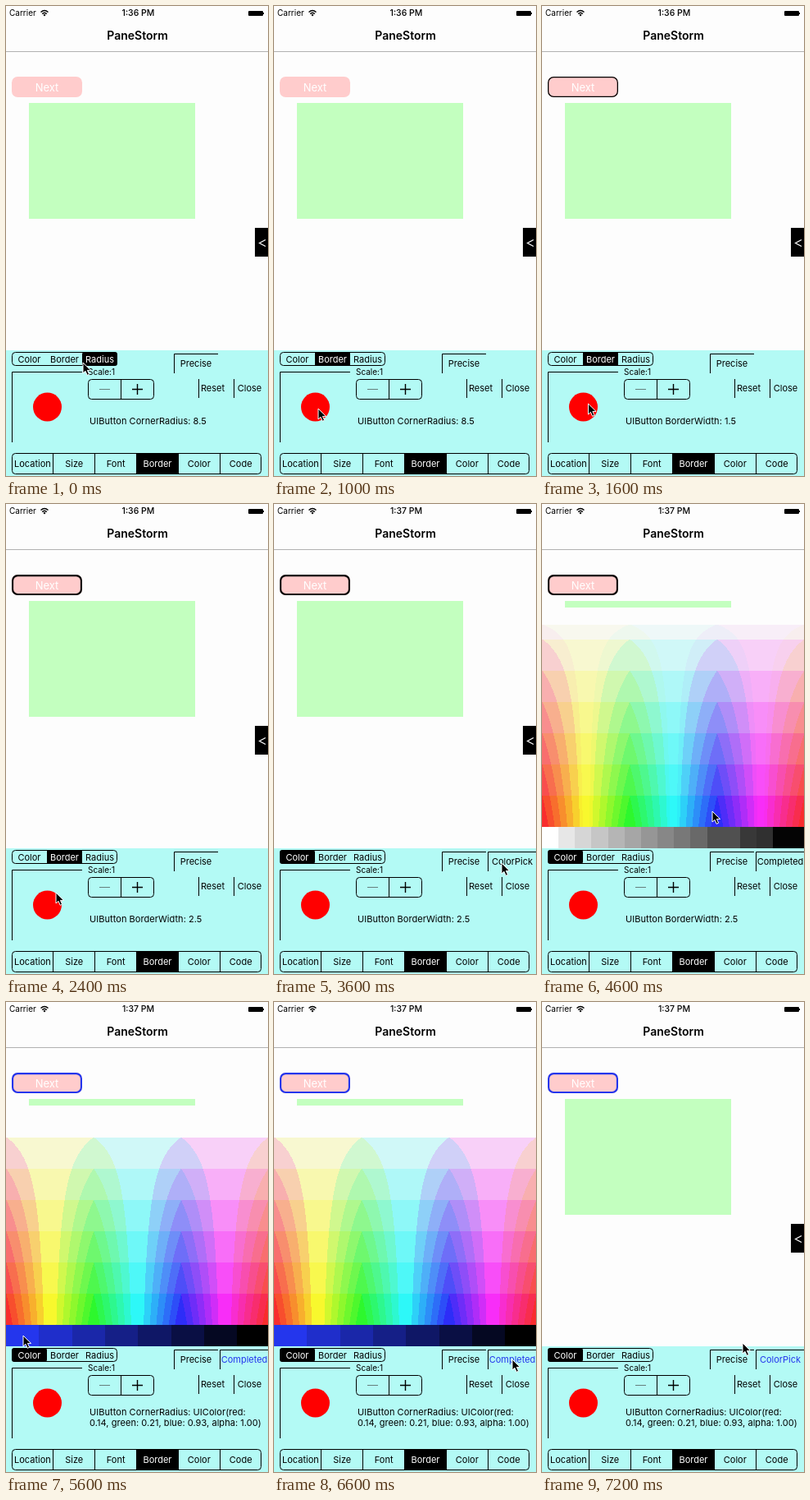
Write an HTML page with a canvas that moves like this. It is 320x572 px and loops after 7400 ms.

```html
<!DOCTYPE html>
<html lang="en">
<head>
<meta charset="utf-8">
<style>
html, body { margin: 0; width: 100%; height: 100%; overflow: hidden; background: #fdfdfd; }
svg, canvas { position: absolute; left: 0; top: 0; }
#picker { top: 126px; }
text { font: 11px Inter, sans-serif; }
.mid { text-anchor: middle; }
.info { letter-spacing: .05px; }
.line { fill: none; stroke: #000; }
</style>
</head>
<body>
<svg width="320" height="572">
  <text x="4" y="12" style="font-size:10px">Carrier</text>
  <g class="line" stroke-width="1.5">
    <path d="M42.5 7.5Q47 3.5 51.5 7.5M44.3 9.6Q47 7 49.7 9.6"/>
    <circle cx="47" cy="11" r=".5"/>
  </g>
  <text id="clock" class="mid" x="161.5" y="12" style="font-size:10.5px;font-weight:500"></text>
  <path d="M297 6h16q1 0 1 1v1h1v2h-1v1q0 1-1 1h-16q-1 0-1-1V7q0-1 1-1"/>
  <text class="mid" x="160.5" y="41" style="font-size:14px;font-weight:600">PaneStorm</text>
  <path d="M0 55.5h320" stroke="#b2b2b2"/>

  <rect x="7" y="86" width="86" height="25" rx="7.25" fill="#fcc"/>
  <text class="mid" x="50" y="103.5" fill="#fff" style="font-size:13px">Next</text>
  <rect id="border" fill="none"/>
  <path d="M28 118h203v141H28z" fill="#c3ffbf"/>
  <path d="M304 270h16v35h-16z"/>
  <path d="M317 284.5l-7.5 4 7.5 4" fill="none" stroke="#fff" stroke-width="1.2"/>

  <path d="M0 419h320v153H0z" fill="#b3faf5"/>
  <g id="topTabs"></g>
  <g id="bottomTabs"></g>
  <path class="line" d="M7.5 531V445.5H93M205.5 447V423.5H259M235.5 454v23M278.5 454v23"/>
  <circle cx="50.5" cy="488" r="17.5" fill="red"/>
  <text x="100" y="449" style="font-size:10px">Scale:1</text>
  <rect class="line" x="100.5" y="454.5" width="80" height="24" rx="4"/>
  <path class="line" d="M140.5 454v25"/>
  <path d="M114 466.5h13" stroke="#667f7d"/>
  <path class="line" d="M154 466.5h13M160.5 460v13" stroke-width="1.4"/>
  <text class="mid" x="232" y="439">Precise</text>
  <text class="mid" x="252.5" y="469">Reset</text>
  <text class="mid" x="297.5" y="469">Close</text>
  <g id="pick">
    <path class="line" d="M261.5 447V423.5H320"/>
    <text id="pickLabel" class="mid" x="291" y="439"></text>
  </g>
  <text id="info1" class="info" x="102"></text>
  <text id="info2" class="info" x="102" y="516"></text>
</svg>
<canvas id="picker" width="320" height="293"></canvas>
<svg width="320" height="572">
  <path id="cursor" d="M-1 0V13L2 10.3 4.2 15.3 6.6 14.2 4.4 9.4H8.6Z" stroke="#fff" stroke-linejoin="round"/>
</svg>
<script>
const LOOP = 7400, STEP = 200;
const BLUE = [36, 54, 237];
const blueCss = `rgb(${BLUE})`;
const path = [
  [0, 95, 434], [400, 72, 430], [600, 72, 430], [1000, 55, 490], [1200, 55, 490],
  [2200, 62, 473], [2400, 62, 473], [2800, 28, 430], [3000, 28, 430], [3600, 279, 437],
  [4000, 279, 437], [4600, 209, 374], [4800, 208, 354], [5200, 208, 354], [5600, 22, 406],
  [5800, 22, 406], [6400, 292, 435], [6800, 292, 435], [7200, 246, 415]
];
const $ = id => document.getElementById(id);
const set = (el, attrs) => {
  for (const name in attrs) el.setAttribute(name, attrs[name]);
};

function drawTabs(id, names, selected, x, y, width, height, baseline, dividers) {
  let out = '';
  names.forEach((name, i) => {
    const left = x + i * width, on = i === selected;
    if (on) out += `<rect x="${Math.floor(left)}" y="${y}" width="${Math.ceil(width)}" height="${height}" rx="${i % (names.length - 1) ? 0 : 3}"/>`;
    if (i && dividers) out += `<path class="line" d="M${Math.floor(left) + .5} ${y}v${height}"/>`;
    out += `<text class="mid" x="${left + width / 2}" y="${baseline}" fill="${on ? '#fff' : '#000'}">${name}</text>`;
  });
  $(id).innerHTML = out +
    `<rect class="line" x="${x + .5}" y="${y + .5}" width="${Math.round(width * names.length) - 1}" height="${height - 1}" rx="4"/>`;
}

// Hue runs across, saturation runs down; each channel is posterised to seven levels.
function drawPicker(picked) {
  const ctx = $('picker').getContext('2d');
  const image = ctx.createImageData(320, 267);
  const tintFrom = picked ? 1 / 7 : .075;
  for (let y = 0, p = 0; y < 267; y++) {
    const full = y / 267 < tintFrom ? 253 : 248;
    for (let x = 0; x < 320; x++) {
      for (const n of [5, 3, 1]) {
        const k = (n + x / 320 * 6) % 6;
        const drop = y / 267 * Math.max(0, Math.min(k, 4 - k, 1));
        const level = Math.floor(drop * 7);
        image.data[p++] = level ? 240 - 32.5 * level : drop > tintFrom ? 238 : full;
      }
      image.data[p++] = 255;
    }
  }
  ctx.putImageData(image, 0, 0);
  const greys = [255, 231, 214, 198, 181, 166, 150, 135, 120, 105, 80, 80, 56, 48, 4, 4];
  for (let i = 0; i < 16; i++) {
    const dim = 1 - (i >> 1) / 7;
    ctx.fillStyle = `rgb(${picked ? BLUE.map(c => Math.round(c * dim)) : Array(3).fill(greys[i])})`;
    ctx.fillRect(Math.round(i * 20.15), 267, 21, 26);
  }
}

function cursorAt(t) {
  const i = path.findIndex(point => point[0] >= t);
  if (i <= 0) return path[0].slice(1);
  const [t0, x0, y0] = path[i - 1], [t1, x1, y1] = path[i];
  const u = (t - t0) / (t1 - t0), ease = u * u * (3 - 2 * u);
  return [x0 + (x1 - x0) * ease, y0 + (y1 - y0) * ease];
}

function render(t) {
  const picked = t >= 5000, open = t >= 4000 && t < 7000;
  const width = t < 1200 ? 0 : Math.min(2.5, (t - 1000) / 400);
  const tab = t < 400 ? 2 : t < 2800 ? 1 : 0;

  $('clock').textContent = t < 3000 ? '1:36 PM' : '1:37 PM';
  drawTabs('topTabs', ['Color', 'Border', 'Radius'], tab, 7, 421, 43, 17, 433.5, false);

  const line = width * .85;
  set($('border'), {
    x: 7 + line / 2, y: 86 + line / 2, width: 86 - line, height: 25 - line,
    rx: 7.25 - line / 2, 'stroke-width': line, stroke: picked ? blueCss : '#000'
  });

  $('pick').style.display = tab ? 'none' : '';
  $('pickLabel').textContent = open ? 'Completed' : 'ColorPick';
  set($('pickLabel'), { fill: picked ? blueCss : '#000' });

  $('info1').textContent = 'UIButton ' + (picked ? 'CornerRadius: UIColor(red:'
    : width ? 'BorderWidth: ' + width.toFixed(1) : 'CornerRadius: 8.5');
  set($('info1'), { y: picked ? 503 : 509 });
  $('info2').textContent = picked ? '0.14, green: 0.21, blue: 0.93, alpha: 1.00)' : '';

  $('picker').style.display = open ? '' : 'none';
  if (open) drawPicker(picked);
  set($('cursor'), { transform: `translate(${cursorAt(t)})` });
}

drawTabs('bottomTabs', ['Location', 'Size', 'Font', 'Border', 'Color', 'Code'], 3, 7, 544, 50.85, 26, 561, true);

let shown = -1;
function tick() {
  const t = Math.floor(performance.now() % LOOP / STEP) * STEP;
  if (t !== shown) render(shown = t);
  requestAnimationFrame(tick);
}
tick();
</script>
</body>
</html>
```
